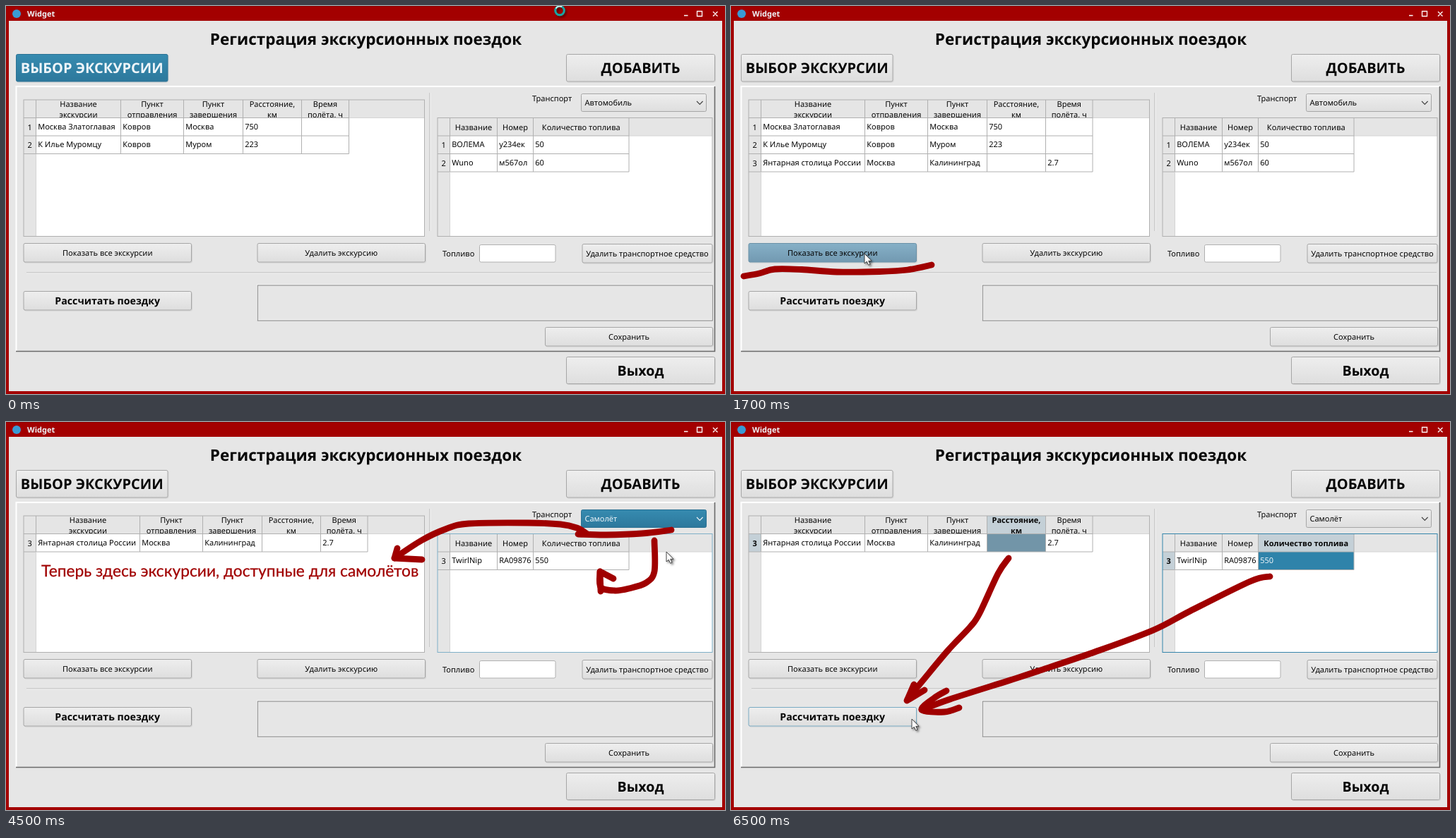
An HTML page that plays this animation: 1018 by 550 pixels, repeating every 8000 ms.

```html
<!DOCTYPE html>
<html lang="ru">
<head>
<meta charset="utf-8">
<title>Widget</title>
<style>
html, body { margin: 0; width: 100%; height: 100%; overflow: hidden; background: #e6e6e6; }
svg { display: block; width: 100%; height: 100%; }
text { font-family: "Noto Sans", "Open Sans", sans-serif; font-size: 11px; fill: #060606; text-rendering: geometricPrecision; }
.bold { font-weight: 700; }
.light { fill: #eef5f9; }
.note { font-family: Lato, Carlito, sans-serif; font-size: 22.75px; fill: #a00000; stroke: #a00000; stroke-width: .25; }
.ink { fill: none; stroke: #a00000; stroke-width: 8.8; stroke-linecap: round; stroke-linejoin: round; }
</style>
</head>
<body>
<svg viewBox="0 0 1018 550">
  <defs>
    <linearGradient id="plain" x2="0" y2="1"><stop stop-color="#eeeeee"/><stop offset="1" stop-color="#dedede"/></linearGradient>
    <linearGradient id="active" x2="0" y2="1"><stop stop-color="#368bb0"/><stop offset="1" stop-color="#2d789c"/></linearGradient>
    <linearGradient id="hover" x2="0" y2="1"><stop stop-color="#86b0c7"/><stop offset="1" stop-color="#7299b1"/></linearGradient>
    <filter id="shadow" x="-50%" y="-50%" width="250%" height="250%"><feDropShadow dx="2" dy="2" stdDeviation="1.5" flood-opacity=".5"/></filter>
  </defs>
  <g id="view"></g>
</svg>
<script>
const view = document.getElementById("view");
const RED = "#a30000", GRAY = "#b0b0b0", BLUE = "#2f83aa", FACE = "#e6e6e6";

const rect = (x, y, w, h, fill, stroke = "none", r = 0) =>
  `<rect x="${x}" y="${y}" width="${w}" height="${h}" rx="${r}" fill="${fill}" stroke="${stroke}"/>`;
const line = (d, color = GRAY, w = 1) =>
  `<path d="${d}" fill="none" stroke="${color}" stroke-width="${w}"/>`;
const text = (x, y, s, cls = "", size = 11) =>
  `<text x="${x}" y="${y}" class="${cls}" style="font-size:${size}px">${s}</text>`;
const mid = (x, y, s, cls = "", size = 11) =>
  `<text x="${x}" y="${y}" class="${cls}" style="font-size:${size}px" text-anchor="middle">${s}</text>`;

// Smooth stroke through a few points
function ink(...p) {
  const at = i => p[Math.max(0, Math.min(p.length - 1, i))];
  let d = `M${p[0]}`;
  for (let i = 0; i < p.length - 1; i++) {
    const [a, b, c, e] = [at(i - 1), at(i), at(i + 1), at(i + 2)];
    d += `C${b.map((v, k) => v + (c[k] - a[k]) / 6)} ${c.map((v, k) => v - (e[k] - b[k]) / 6)} ${c}`;
  }
  return `<path class="ink" d="${d}"/>`;
}
const tip = (a, b, c) => `<path class="ink" d="M${a}L${b}L${c}"/>`;

const cursor = (x, y) =>
  `<path transform="translate(${x} ${y})" d="M0 0V14L3.3 11.2L5.7 16.3L8 15.2L5.7 10.3H10Z" fill="#fff" stroke="#333" stroke-width=".9" filter="url(#shadow)"/>`;

function button(x, y, w, h, label, { size = 11, look = "plain", edge = "#a6a6a6", cls = "" } = {}) {
  const base = y + h / 2 + size * 0.36;
  return rect(x + 1, y + 1, w, h, "none", "#d2d2d2", 2) + rect(x, y, w, h, `url(#${look})`, edge, 2) +
    mid(x + w / 2, base, label, (size > 11 ? "bold " : "") + cls, size);
}

// cols: column edges; head: titles, "|" splits lines; rows: [number, ...cells]
function table(id, x, y, w, h, cols, head, rows, { edge = GRAY, pick = -1, pickFill = BLUE } = {}) {
  const H = 25.5, top = y + H, left = cols[0], right = cols[cols.length - 1];
  let s = rect(x, y, w, h, "#fff") + rect(x, y, w, H, "#e5e5e5") + rect(x, y, left - x, h, "#e5e5e5");
  s += `<clipPath id="${id}">${rect(x, y, w, H, "#000")}</clipPath><g clip-path="url(#${id})">`;
  head.forEach((title, i) => {
    const c = (cols[i] + cols[i + 1]) / 2, cls = i === pick ? "bold" : "";
    if (cls) s += rect(cols[i], y, cols[i + 1] - cols[i], H, "#c4d0d7");
    const parts = title.split("|");
    parts.forEach((p, k) => { s += mid(c, y + (parts.length > 1 ? 10 + 14.7 * k : 17.5), p, cls); });
  });
  s += "</g>";
  rows.forEach(([n, ...cells], r) => {
    const ry = top + r * H;
    if (pick >= 0) {
      s += rect(x, ry, left - x, H, "#c4d0d7");
      s += rect(cols[pick], ry, cols[pick + 1] - cols[pick], H, pickFill);
    }
    s += mid((x + left) / 2, ry + 17, n, pick >= 0 ? "bold" : "");
    cells.forEach((c, i) => { s += text(cols[i] + 2.7, ry + 16.3, c, i === pick ? "light" : ""); });
    s += line(`M${x} ${ry + H}H${right}`);
  });
  const bottom = top + rows.length * H;
  s += line(`M${x} ${top}H${right}`) + line(`M${right} ${top}H${x + w}M${left} ${bottom}V${y + h}`, "#d4d4d4");
  cols.forEach(c => { s += line(`M${c} ${y}V${bottom}`); });
  return s + rect(x, y, w, h, "none", edge);
}

const trips = [
  [1, "Москва Златоглавая", "Ковров", "Москва", "750", ""],
  [2, "К Илье Муромцу", "Ковров", "Муром", "223", ""],
  [3, "Янтарная столица России", "Москва", "Калининград", "", "2.7"]
];
const cars = [[1, "ВОЛЕМА", "у234ек", "50"], [2, "Wuno", "м567ол", "60"]];
const planes = [[3, "TwirlNip", "RA09876", "550"]];
const tripHead = ["Название|экскурсии", "Пункт|отправления", "Пункт|завершения", "Расстояние,|км", "Время|полёта, ч"];
const carHead = ["Название", "Номер", "Количество топлива"];
const wide = [42.5, 189.5, 278.5, 362.5, 445.5, 512];
const narrow = [42.5, 162.5, 251.5, 335.5, 418.5, 485.5];

function combo({ value = "Автомобиль", look = "plain", edge = "#a6a6a6" }) {
  const lit = look === "active";
  return rect(814.5, 124.5, 177, 25, `url(#${look})`, edge, 2) +
    text(819.5, 141, value, lit ? "light" : "") +
    line("M978 135l4.3 4.3l4.3 -4.3", lit ? "#eef5f9" : "#444", 1.2);
}

function frameWindow() {
  return rect(0, 0, 1018, 550, RED) + rect(4, 21, 1010, 525, FACE) +
    line("M0 .5H1018", "#8c0000") +
    `<circle cx="15" cy="11" r="6" fill="#3a9ad4"/>` +
    text(30, 14.7, "Widget", "bold light") +
    line("M960 13.5H965.5M978.5 7.5h7v7h-7ZM1001 8l6.5 6.5M1007.5 8l-6.5 6.5", "#fff", 1.3) +
    mid(509.5, 55, "Регистрация экскурсионных поездок", "bold", 22.5);
}

function panel() {
  return line("M14.5 490V114H1003", "#fff", 2) + line("M14 489.5H1003.5V114", "#6a6a6a", 1.6) +
    line("M600 123V319") + line("M601 123V319", "#f6f6f6") +
    line("M29 378H999") + line("M29 379H999", "#f6f6f6") +
    rect(355.5, 395, 644, 50, "none", "#fafafa") + rect(356.3, 396, 644, 50, "none", "#858585");
}

function form(s) {
  return frameWindow() + panel() +
    button(14.5, 68.5, 214.5, 38.5, "ВЫБОР ЭКСКУРСИИ", { size: 20, ...s.choose }) +
    button(793.5, 68.5, 210, 38.5, "ДОБАВИТЬ", { size: 20 }) +
    table("trips", 25, 133, 567.5, 193.5, s.cols || wide, tripHead, s.trips, s.tripOpt) +
    table("cars", 611, 158.5, 389, 168, [628.5, 695.5, 746.5, 882], carHead, s.cars, s.carOpt) +
    text(745, 135, "Транспорт") +
    button(25, 336.5, 237.5, 26.5, "Показать все экскурсии", s.show) +
    button(356, 336.5, 237.5, 26.5, "Удалить экскурсию") +
    text(618, 355, "Топливо") + rect(670.5, 338.5, 107.5, 24.5, "#fff", GRAY, 2) +
    button(816, 337.5, 184, 26.5, "Удалить транспортное средство") +
    button(25, 404.5, 237.5, 26.5, "Рассчитать поездку", { size: 14.2, ...s.calc }) +
    button(763.5, 455.5, 237, 26.5, "Сохранить") +
    button(793.5, 497.5, 210, 38, "Выход", { size: 19.6 });
}

const spinner = `<g fill="none" filter="url(#shadow)"><circle cx="784" cy="6.5" r="6.3" stroke="#17a6a4" stroke-width="3"/>
  <path d="M778.5 3.5A6.3 6.3 0 0 1 787 1" stroke="#d8f6f2" stroke-width="1.8"/></g>`;

const popup = rect(814.5, 150.5, 177, 52, "#fff", "#a9a9a9") + rect(815, 151, 176, 25, BLUE) +
  text(818, 167, "Автомобиль", "light") + text(818, 192.5, "Самолёт");

const scenes = [
  { until: 500, cols: narrow, trips: trips.slice(0, 2), cars, choose: { look: "active", edge: "#2b7193", cls: "light" },
    combo: {}, over: spinner },
  { until: 2500, trips, cars, show: { look: "hover", edge: "#6b92a8" }, combo: {},
    over: ink([18, 383], [40, 379], [62, 373], [100, 373.5], [150, 377], [210, 376.5], [250, 374], [284, 367]) + cursor(189, 351) },
  { until: 4500, lift: 1, trips, cars, combo: { edge: "#7fb0c8" },
    over: popup + ink([745, 146], [795, 146], [803, 139], [812, 124], [828, 117], [848, 115], [872, 121], [918, 137]) +
      tip([900, 121], [918, 136], [898, 143]) },
  { until: 6500, trips: trips.slice(2), cars: planes, carOpt: { edge: "#7fb0c8" },
    combo: { value: "Самолёт", look: "active", edge: "#2b7193" },
    over: `<text class="note" x="50" y="219">Теперь здесь экскурсии, доступные для самолётов</text>` +
      ink([810, 159], [850, 160], [900, 158], [942, 153]) +
      ink([822, 158], [808, 150], [785, 145], [740, 143], [655, 144], [622, 152], [588, 168], [550, 193]) +
      tip([554, 179], [550, 193], [589, 195]) +
      ink([918, 168], [918, 212], [906, 228], [882, 236], [862, 239], [842, 234], [841, 212]) +
      tip([860, 222], [841, 212], [842, 240]) + cursor(935, 184) },
  { until: 8000, trips: trips.slice(2), cars: planes, tripOpt: { pick: 3, pickFill: "#7295a8" },
    carOpt: { pick: 2, edge: "#3585ab" }, calc: { edge: "#78aac3" }, combo: { value: "Самолёт" },
    over: ink([393, 193], [378, 215], [352, 271], [339, 290], [307, 324], [272, 366], [250, 393]) +
      tip([259, 372], [249, 395], [274, 380]) +
      ink([763, 219], [735, 226], [650, 268], [598, 295], [515, 326], [435, 353], [395, 366], [310, 393], [270, 408]) +
      ink([305, 381], [288, 391], [270, 408], [302, 411], [323, 405]) + cursor(256, 421) }
];

let shown;
function draw(now) {
  const scene = scenes.find(s => now % 8000 < s.until);
  if (scene !== shown) {
    shown = scene;
    view.innerHTML = `<g transform="translate(0 ${-(scene.lift || 0)})">${form(scene)}</g>` + combo(scene.combo) + scene.over;
  }
  requestAnimationFrame(draw);
}
draw(performance.now());
</script>
</body>
</html>
```
